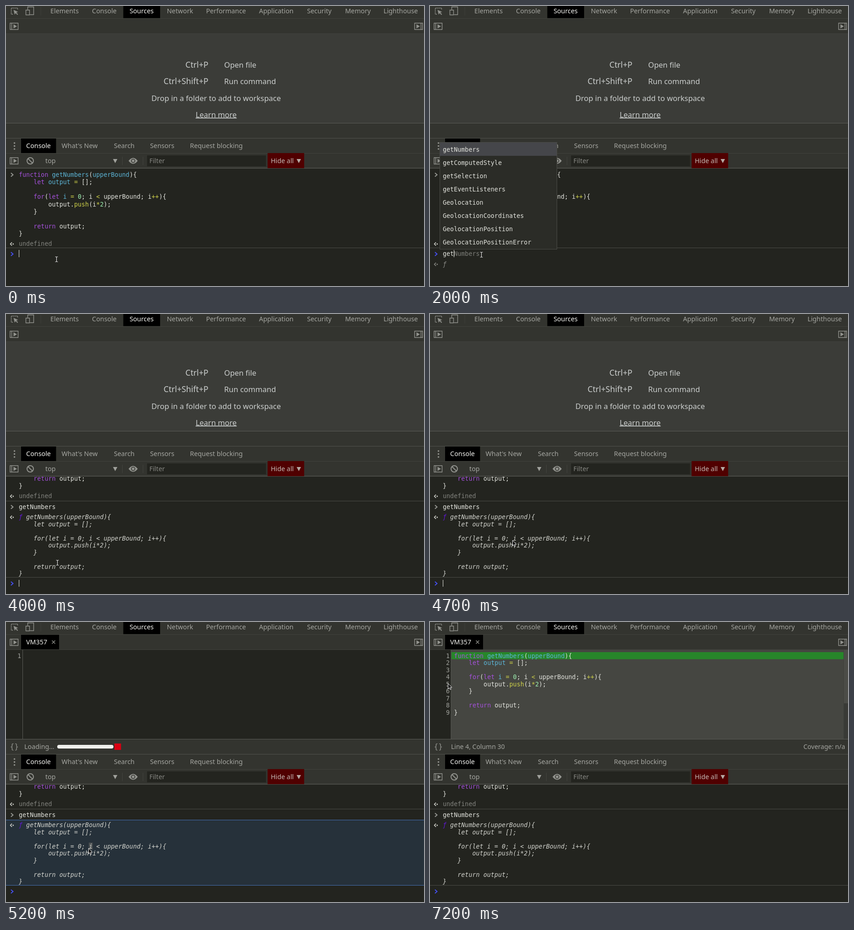
An HTML page that plays this animation: 914 px wide and 613 px high, repeating every 8000 ms.

```html
<!DOCTYPE html>
<html lang="en">
<head>
<meta charset="utf-8">
<title>Console walkthrough</title>
<style>
html, body { margin: 0; width: 100%; height: 100%; overflow: hidden; background: #23241f; }
svg { display: block; width: 914px; height: 613px; }
text { font: 14.3px "Noto Sans", "Open Sans", sans-serif; fill: #a5a6a1; white-space: pre; }
.m { font-family: "DejaVu Sans Mono", monospace; font-size: 13.4px; fill: #e2e3dd; }
.it { font-style: italic; fill: #d3d4ce; }
.ico { fill: none; stroke: #92938e; stroke-width: 1.4; }
.fill { fill: #92938e; }
.kw { fill: #a551dc; } .def { fill: #5cb4d6; } .num { fill: #9ff3b2; } .op { fill: #ced149; }
</style>
</head>
<body>
<svg id="stage" viewBox="0 0 914 613" xmlns="http://www.w3.org/2000/svg"></svg>
<script>
const LOOP = 8000, STEP = 100;
const stage = document.getElementById('stage');
const source = [
  'function getNumbers(upperBound){',
  '    let output = [];',
  '',
  '    for(let i = 0; i < upperBound; i++){',
  '        output.push(i*2);',
  '    }',
  '',
  '    return output;',
  '}'
];

const esc = s => s.replace(/&/g, '&amp;').replace(/</g, '&lt;');
const rect = (x, y, w, h, fill, more = '') =>
  `<rect x="${x}" y="${y}" width="${w}" height="${h}" fill="${fill}" ${more}/>`;
const path = (d, more = 'class="ico"') => `<path d="${d}" ${more}/>`;
const text = (x, y, s, style = '', anchor = 'start') =>
  `<text x="${x}" y="${y}" text-anchor="${anchor}" style="${style}">${esc(s)}</text>`;
// code sits on whole-pixel baselines
const mono = (x, y, s, cls = '', style = '') =>
  `<text class="m ${cls}" x="${x}" y="${Math.round(y)}" style="${style}">${s}</text>`;
const during = (from, to, ...parts) =>
  `<g data-from="${from}" data-to="${to}">${parts.join('')}</g>`;

const token = /(function|let|for|return)|(getNumbers|upperBound(?=\))|output(?= =)|i(?= =))|(\d)|(\+\+|[=<*]|push)/g;
const paint = line => line.replace(token, (word, kw, def, num) => {
  const cls = kw ? 'kw' : def ? 'def' : num ? 'num' : 'op';
  return `<tspan class="${cls}">${esc(word)}</tspan>`;
});
const listing = (x, y, pitch) =>
  source.map((s, i) => mono(x, y + i * pitch, paint(s))).join('');

const chevron = (y, color) =>
  path(`M10.8 ${y - 4}l4.6 4l-4.6 4`, `fill="none" stroke="${color}" stroke-width="2"`);
const reply = (y, color) =>
  path(`M13 ${y - 3.5}l-3.4 3.5l3.4 3.5`, `fill="none" stroke="${color}" stroke-width="1.8"`) +
  `<circle cx="15.7" cy="${y}" r="1.5" fill="${color}"/>`;
const rule = (y, color = '#4b4c47') => rect(0, y, 914, 1, color);
const caret = (x, y, h = 16) => rect(x, y, 1, h, '#e4e5df');
const GRAY = '#969792', BLUE = '#4650f0', LIGHT = '#c4c5bf', DIM = '#7d7e79';

const history = dy => `<g transform="translate(0 ${dy})">` + chevron(369.5, GRAY) +
  listing(28, 374, 16.15) + reply(521, LIGHT) +
  mono(28, 525, 'undefined', '', 'fill:#82837e') + '</g>';

const typed = (n, from, to) => {
  const word = 'getNumbers';
  const ghost = n > 1 ? `<tspan fill="${DIM}">${word.slice(n)}</tspan>` : '';
  return during(from, to, mono(28, 547, word.slice(0, n) + ghost),
    caret(Math.floor(28.3 + n * 8.067), 534));
};

const result = source.map((s, i) => i
  ? mono(28, 449 + i * 15.5, esc(s), 'it')
  : mono(28, 449, `<tspan fill="#5f18d2">ƒ</tspan> ${s.replace('function ', '')}`, 'it')).join('');

function consoleView() {
  return rect(0, 355, 914, 258, '#23241f') +
    during(0, 4000, history(0), rule(529)) +
    during(0, 3600, chevron(543, BLUE)) +
    during(0, 200, caret(28, 534)) + during(700, 1500, caret(28, 534)) +
    typed(1, 1700, 1900) + typed(2, 1900, 2000) + typed(3, 2000, 2200) +
    typed(4, 2200, 2700) + typed(5, 2700, 3100) + typed(10, 3100, 3600) +
    during(1900, 3600, reply(565.5, DIM), mono(28, 570, 'ƒ', 'it', 'fill:#8b8c87')) +
    during(3600, 4000, chevron(543, GRAY), mono(28, 547, 'getNumbers'),
      rule(553), chevron(566, BLUE), caret(28, 558)) +
    during(4000, LOOP, history(-122), rule(409), chevron(422.5, GRAY),
      mono(28, 427, 'getNumbers')) +
    during(5100, 5500, rect(0, 433, 914, 144, '#26313a')) +
    during(5200, 5500, rect(181, 483, 8.5, 15, '#4b5052')) +
    during(4000, LOOP, reply(445, LIGHT), result, rule(576), chevron(590, BLUE)) +
    during(5100, 5500, rule(433, '#4470b4'), rule(576, '#4470b4')) +
    during(4000, 4500, caret(28, 582, 15)) + during(4700, 5100, caret(28, 582, 15));
}

const sidebar = (x, y, right) => {
  const bar = x + (right ? 14 : 3.5), tri = x + (right ? 4 : 7.5);
  return path(`M${x} ${y}h17.5v14h-17.5zM${bar} ${y}v14`) +
    path(`M${tri} ${y + 2.5}l7.5 4.5l-7.5 4.5z`, 'class="fill"');
};
const drop = (x, fill) => path(`M${x} 335h9.5l-4.75 9z`, `fill="${fill}"`);

function topBar() {
  const tabs = [['Elements', 128], ['Console', 215], ['Sources', 296.5], ['Network', 380.5],
    ['Performance', 481], ['Application', 591], ['Security', 685], ['Memory', 769.5], ['Lighthouse', 863]];
  return rect(0, 0, 914, 61, '#33342f') + rect(256.5, 0, 80.5, 26.5, '#000') + rule(27, '#41423d') +
    tabs.map(([s, x]) => text(x, 16, s, s === 'Sources' ? 'fill:#f4f4f0' : '', 'middle')).join('') +
    path('M15 18h-3.5v-13.500h14v4', 'class="ico" stroke-dasharray="2.5 1"') +
    path('M16.500 8.500l10 4.500l-4 1.300l3.800 4l-1.500 1.300l-3.800-4.200l-2 3.600z', 'class="fill"') +
    path('M47.500 8v-6h13v17h-8M43.500 9h8v10.500h-8z') +
    rect(75.5, 2, 1, 19, '#40413c') +
    sidebar(9, 37.5) + sidebar(893.5, 37.5, true) + rule(60, '#41423d');
}

function welcome() {
  const big = 'font-size:16.5px;fill:#cbcecd', keys = 'font-size:17.7px;fill:#cbcecd';
  return during(0, 5200, rect(0, 61, 914, 196, '#3b3c38'),
    text(442.5, 135, 'Ctrl+P', keys, 'end'), text(477, 135, 'Open file', big),
    text(442.5, 171, 'Ctrl+Shift+P', keys, 'end'), text(477, 171, 'Run command', big),
    text(459.5, 207.5, 'Drop in a folder to add to workspace', big, 'middle'),
    text(459.5, 243.5, 'Learn more', big + ';text-decoration:underline', 'middle'));
}

function editor() {
  const top = 78.5, pitch = 15.5;
  const number = (x, i) =>
    `<text class="m" x="${x}" y="${Math.round(top + i * pitch)}" text-anchor="end" style="fill:#a0a19c">${i + 1}</text>`;
  const status = s => text(46, 277.7, s, 'font-size:14px');
  const braces = mono(8.5, 278, '{}', '', 'font-size:16px;fill:#92938e');
  const foot = rect(0, 256, 914, 34, '#33342f') + rule(256, '#5b5c57');
  return during(5200, LOOP, rect(33, 28, 83, 32, '#000'),
      text(44, 49, 'VM357', 'fill:#f0f0ec'), path('M100.500 40.500l7 7m0-7l-7 7'),
      rect(0, 61, 914, 196, '#23241f')) +
    during(5200, 5500, rect(36, 61, 1, 195, '#5b5c57'), number(33, 0)) +
    during(5500, LOOP, rect(46, 61, 859, 195, '#454641'), rect(45.5, 61, 1, 195, '#5b5c57'),
      rect(47, 66, 857.5, 15.5, '#27862a'), rect(904.5, 61, 9.5, 195, '#393a36'),
      rect(905, 61, 9, 117, '#4b4c47'), source.map((s, i) => number(43, i)).join(''),
      listing(52.6, top, pitch)) +
    during(5500, 6400, rect(206, 81, 8, 1.2, '#eee'), rect(295, 81, 8, 1.2, '#eee')) +
    foot +
    during(5200, LOOP, braces) +
    during(5200, 5500, text(40, 277.7, 'Loading…'),
      rect(112, 269, 123, 8, '#efefec', 'rx="4"'), rect(237, 266, 14.5, 14, '#d90012')) +
    during(5500, 6400, status('Line 1, Column 20')) +
    during(6400, LOOP, status('Line 4, Column 30')) +
    during(5500, LOOP, text(907.5, 277.7, 'Coverage: n/a', 'font-size:14px', 'end'));
}

function drawer() {
  const tabs = [['Console', 71], ["What's New", 161], ['Search', 258.5], ['Sensors', 341.5], ['Request blocking', 460]];
  return rect(0, 289, 914, 67, '#33342f') + rule(289, '#50514c') + rect(33, 290, 76.5, 32, '#000') +
    [300, 306.5, 313].map(y => `<circle cx="18.500" cy="${y}" r="1.800" class="fill"/>`).join('') +
    tabs.map(([s, x]) => text(x, 311, s, s === 'Console' ? 'fill:#f4f4f0' : '', 'middle')).join('') +
    rule(322, '#42433e') + sidebar(9, 332) +
    '<circle cx="53" cy="339" r="7" class="ico" style="stroke-width:2"/>' +
    path('M48 334l10 10', 'class="ico" style="stroke-width:2"') +
    text(86, 344, 'top') + drop(234, '#a0a19c') + rect(254, 330, 1, 18, '#42433e') +
    path('M268 339q10-13 20 0q-10 13-20 0z', 'class="fill"') +
    '<circle cx="278" cy="339" r="3.800" fill="none" stroke="#33342f" stroke-width="1.600"/>' +
    rect(299, 330, 1, 18, '#42433e') +
    rect(308.5, 327, 260, 24, '#23241f') + text(313.5, 344, 'Filter', 'fill:#868782') +
    rule(354.5, '#62635e') +
    rect(572, 322, 80, 33, '#500000') + text(579, 344, 'Hide all', 'fill:#c3bab5') + drop(635.5, '#b5a9a4');
}

function suggestions() {
  const names = ['getNumbers', 'getComputedStyle', 'getSelection', 'getEventListeners', 'Geolocation',
    'GeolocationCoordinates', 'GeolocationPosition', 'GeolocationPositionError'];
  return during(1900, 2200, rect(21.5, 298.5, 256, 234, '#2b2c27', 'stroke="#4b4c47"'),
    rect(22, 299, 255, 29, '#45464a'),
    names.map((s, i) => mono(28, 318.5 + i * 29, s)).join(''));
}

// [time, x, y]; a leg eases between two neighbouring rows
const route = [
  [0, 110, 554], [600, 110, 554], [800, 112, 544], [4200, 112, 544], [4500, 112, 495],
  [4600, 112, 495], [4700, 180, 495], [5600, 180, 495], [6200, 283.5, 125],
  [6300, 283.5, 125], [7000, 5, 141], [7200, 39, 134], [LOOP, 39, 134]
];
const beam = 'M-3 -5.500h2l1 1l1-1h2M0-4.500v9M-3 5.500h2l1-1l1 1h2';
const arrow = 'M0 0v12l2.800-2.600l1.900 4.200l1.900-.9l-1.800-4h3.700z';

stage.innerHTML = consoleView() + topBar() + welcome() + editor() + drawer() + suggestions() +
  `<g id="pointer"><g id="beam">${path(beam, 'fill="none" stroke="#111" stroke-width="2.600"')}` +
  `${path(beam, 'fill="none" stroke="#f2f2ee" stroke-width="1.200"')}</g>` +
  `<g id="arrow">${path(arrow, 'fill="#111" stroke="#eee" stroke-width="1"')}</g></g>`;

const timed = [...stage.querySelectorAll('[data-from]')].map(el =>
  ({ el, from: +el.dataset.from, to: +el.dataset.to }));
const pointer = document.getElementById('pointer');
const beamShape = document.getElementById('beam');
const arrowShape = document.getElementById('arrow');
const show = (el, on) => { el.style.display = on ? '' : 'none'; };

function pointerAt(t) {
  const i = route.findIndex((p, k) => k && t <= p[0]);
  const [t0, x0, y0] = route[i - 1], [t1, x1, y1] = route[i];
  const u = (t - t0) / (t1 - t0), k = u * u * (3 - 2 * u);
  return [x0 + (x1 - x0) * k, y0 + (y1 - y0) * k];
}

const start = performance.now();
function draw(now) {
  const t = Math.max(0, now - start) % LOOP;
  const tick = Math.floor(t / STEP) * STEP;
  for (const g of timed) show(g.el, t >= g.from && t < g.to);
  const [x, y] = pointerAt(tick);
  const isBeam = tick < 4300 || (tick > 5600 && x > 46 && y < 256);
  pointer.setAttribute('transform', `translate(${Math.round(x) + .5} ${Math.round(y) + .5})`);
  show(beamShape, isBeam);
  show(arrowShape, !isBeam);
  requestAnimationFrame(draw);
}
draw(start);
</script>
</body>
</html>
```
